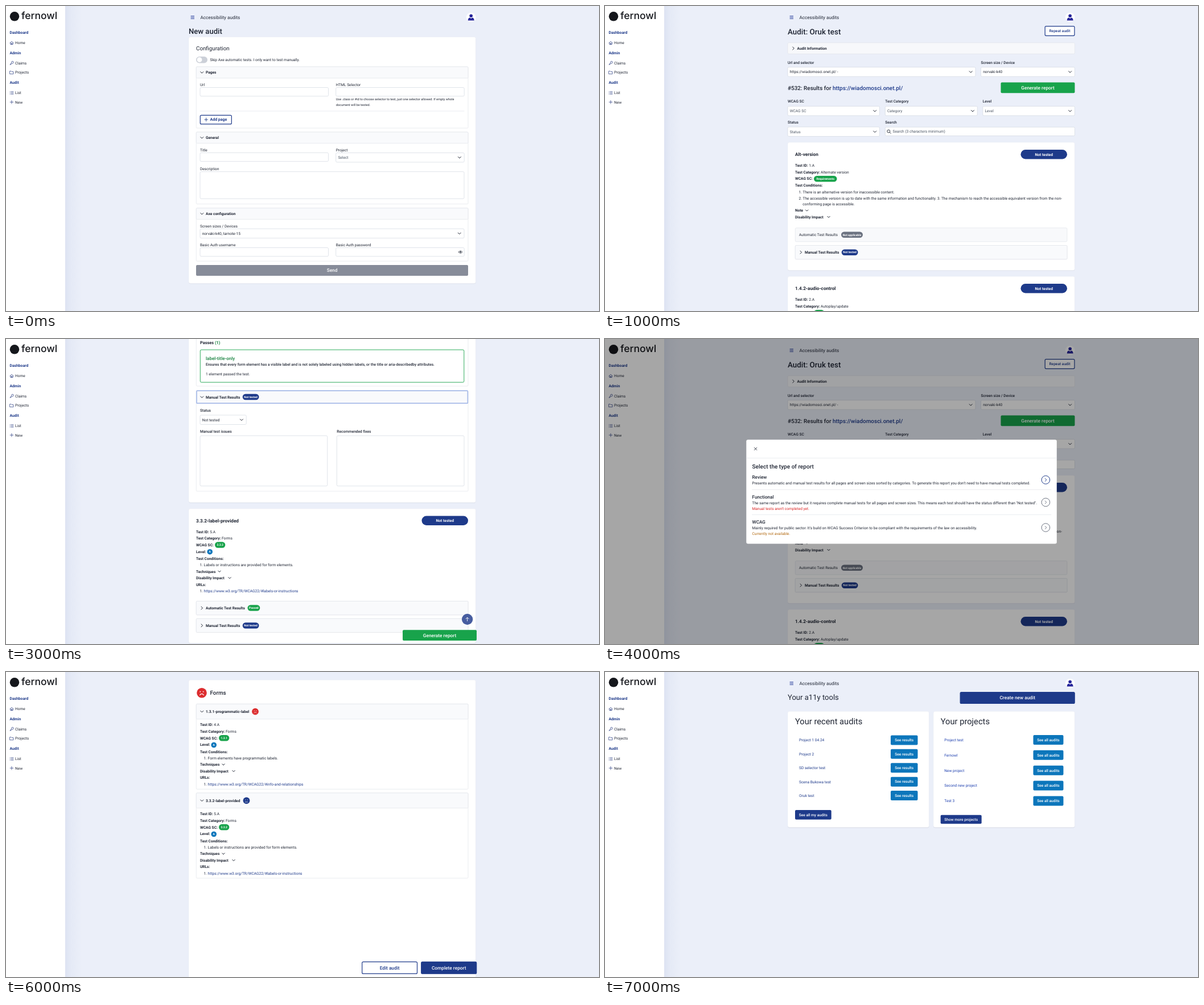
Recreate the animation shown at these times as an HTML page. Size 1042 by 537 pixels, loop 8000 ms.

```html
<!DOCTYPE html>
<html lang="en">
<head>
<meta charset="utf-8">
<title>Accessibility audits</title>
<style>
  html, body { margin: 0; width: 100%; height: 100%; overflow: hidden; background: #ebeff9; }
  svg { display: block; width: 1042px; height: 537px; }
  text { font-family: Roboto, "Open Sans", sans-serif; text-rendering: geometricPrecision; white-space: pre; }
  .word { font-family: Inter, sans-serif; }
  .scene { display: none; }
  .scene.on { display: inline; }
</style>
</head>
<body>
<svg id="stage" viewBox="0 0 1042 537" xmlns="http://www.w3.org/2000/svg"></svg>
<script>
const INK = '#1f2533', NAVY = '#1e3a8a', GREEN = '#18a34b', RED = '#dc2d2f', BLUE = '#0c76bb',
      GRAY = '#6b7280', LINE = '#e1e4ea', EDGE = '#d3d8e1';
const STEP = 1000;
const SITE = 'https://wiadomosci.onet.pl/';

// Basic shapes; text is placed by the middle of its capitals.
const rect = (x, y, w, h, fill, stroke = 'none', r = 2, sw = .7) =>
  `<rect x="${x}" y="${y}" width="${w}" height="${h}" rx="${r}" fill="${fill}" stroke="${stroke}" stroke-width="${sw}"/>`;
const text = (x, y, s, size = 6.6, weight = 400, fill = INK, anchor = 'start') =>
  `<text x="${x}" y="${y + size * .35}" font-size="${size}" font-weight="${weight}" fill="${fill}" text-anchor="${anchor}">${s}</text>`;
const bold = (x, y, s, size = 6.6, fill = INK) => text(x, y, s, size, 600, fill);
const mid = (x, y, s, size, weight, fill) => text(x, y, s, size, weight, fill, 'middle');
const path = (d, stroke = INK, sw = 1, fill = 'none') =>
  `<path d="${d}" fill="${fill}" stroke="${stroke}" stroke-width="${sw}" stroke-linecap="round" stroke-linejoin="round"/>`;
const circle = (x, y, r, fill, stroke = 'none', sw = 1) =>
  `<circle cx="${x}" cy="${y}" r="${r}" fill="${fill}" stroke="${stroke}" stroke-width="${sw}"/>`;
const rule = (x, y, w) => path(`M${x} ${y}h${w}`, LINE, .7);

// Interface parts
const down = (x, y, c, k = 2.5) => path(`M${x - k} ${y - k / 2}l${k} ${k}l${k} ${-k}`, c);
const right = (x, y, c, k = 2.5) => path(`M${x - k / 2} ${y - k}l${k} ${k}l${-k} ${k}`, c);
const field = (x, y, w, h = 15.3) => rect(x, y, w, h, '#fff', EDGE);
const select = (x, y, w, s, fill = INK) =>
  field(x, y, w, 16.5) + text(x + 3.7, y + 8.3, s, 6.6, 400, fill) + down(x + w - 8.3, y + 8.3);
const button = (x, y, w, h, s, size, fill, stroke, color = '#fff') =>
  rect(x, y, w, h, fill, stroke, 2, 1.2) + mid(x + w / 2, y + h / 2, s, size, 500, color);
const pill = (x, y, w, s, fill) =>
  rect(x, y - 5.2, w, 10.4, fill, 'none', 5.2) + mid(x + w / 2, y, s, 5, 700, '#fff');
const badge = y => rect(730.5, y - 8.2, 81.5, 16.4, NAVY, 'none', 8.2) + mid(771.3, y, 'Not tested', 6.7, 700, '#fff');
const card = (x, y, w, h) =>
  rect(x, y + .8, w, h, '#d5dae6', 'none', 3) + rect(x, y, w, h, '#fff', '#e6e9f1', 3, .5);
const panel = (y, h, head, s) =>
  rect(334.3, y, 477.7, h, '#fff', LINE, 1.5) + rect(334.3, y, 477.7, head, '#f9fafc', LINE, 1.5) +
  (h > head ? down : right)(344.3, y + head / 2) + bold(351, y + head / 2, s);
const face = (x, y, r, fill, bend) => {
  const k = r / 9;
  return circle(x, y, r, fill) + circle(x - 2.7 * k, y - 2 * k, .9 * k, '#fff') + circle(x + 2.7 * k, y - 2 * k, .9 * k, '#fff') +
    path(`M${x - 3.5 * k} ${y + 4 * k}q${3.5 * k} ${bend * k} ${7 * k} 0`, '#fff', 1.1 * k);
};
const logo = (x, y, size) =>
  circle(x, y, size / 2, '#15171c') +
  `<text class="word" x="${x + 12}" y="${y + size * .27}" font-size="${size * 1.06}" font-weight="500" fill="#15171c">fernowl</text>`;

const sidebar = () => {
  const icons = {
    Home: 'M7 65l3-2.7l3 2.7M7.8 64.6v3h4.4v-3M9.4 67.6v-2h1.2v2',
    Claims: 'M9.7 99.7a1.8 1.8 0 1 1 1.5 1.2L7.2 103.6l.6-1.6z',
    Projects: 'M7 114.7h2.2l.9 1h2.9v4h-6z',
    List: 'M8.8 150.8h4.2M8.8 153h4.2M8.8 155.2h4.2M7 150.8h.2M7 153h.2M7 155.2h.2',
    New: 'M10 166.4v5.6M7.2 169.2h5.6'
  };
  const heads = { Dashboard: 47, Admin: 83, Audit: 135 };
  const items = { Home: 65, Claims: 100.7, Projects: 117, List: 153, New: 169.2 };
  return rect(0, 0, 104, 537, '#fff', 'none', 0) + logo(15, 18.3, 16.5) +
    Object.entries(heads).map(([s, y]) => bold(6.5, y, s, 6.75, NAVY)).join('') +
    Object.entries(items).map(([s, y]) => text(16, y, s) + path(icons[s], '#3a4c8c', .8)).join('');
};

const header = () =>
  path('M325 17.7h5.6M325 20h5.6M325 22.3h5.6', '#3146a0', 1) + text(341.5, 20, 'Accessibility audits', 8.15) +
  circle(817.2, 20, 8.3, '#fff') + circle(817.2, 17.3, 2.8, '#25259a') +
  path('M812 25.2q0-4.2 3-4.4l2.2 1.2l2.2-1.2q3 .2 3 4.4z', '#25259a', .4, '#25259a');

const pair = (x, y, key, value = '') => text(x, y, `<tspan font-weight="600">${key}</tspan> ${value}`);

function formScene() {
  return header() + text(321, 44.7, 'New audit', 13.1, 500) + card(321, 54.5, 504.5, 434) +
    text(334, 75, 'Configuration', 9.8) +
    rect(334, 89, 20, 11.4, '#ccd0d8', 'none', 5.7) + circle(340, 94.7, 4.4, '#fff') +
    text(358.5, 94.7, 'Skip Axe automatic tests. I only want to test manually.') +
    panel(107, 108, 20, 'Pages') +
    text(341, 138.5, 'Url') + field(341, 143.5, 225.5) +
    text(579.7, 138.5, 'HTML Selector') + field(579.7, 143.5, 225.5) +
    text(579.7, 164.3, 'Use .class or #id to choose selector to test, just one selector allowed. If empty whole', 5.55) +
    text(579.7, 174, 'document will be tested.', 5.55) + rule(341, 185, 464) +
    rect(341.3, 192.3, 55, 15.6, '#fff', NAVY, 2, 1.2) + path('M351.7 197.2v5.6M348.9 200h5.6', NAVY, .9) +
    bold(358.5, 200, 'Add page', 7, NAVY) +
    panel(222, 126.6, 19.7, 'General') +
    text(341, 253.3, 'Title') + field(341, 258.3, 225.5) +
    text(579.7, 253.3, 'Project') + select(579.7, 258.5, 225.5, 'Select', '#4b5563') +
    text(341, 286.8, 'Description') + field(341, 291.7, 464, 47.6) +
    panel(355.8, 93.4, 19.8, 'Axe configuration') +
    text(341, 387.2, 'Screen sizes / Devices') + select(341, 392.2, 464, 'norvaki-k40, tarnote-15') +
    text(341, 420.7, 'Basic Auth username') + field(341, 425.5, 225.5) +
    text(579.7, 420.7, 'Basic Auth password') + field(579.7, 425.5, 225.5) +
    path('M795.4 433.2q3.2-4.4 6.4 0q-3.2 4.4-6.4 0z', INK, .8) + circle(798.6, 433.2, 1.1, INK) +
    rect(334, 456, 478, 19, '#878c99') + mid(573, 465.6, 'Send', 8.2, 500, '#fff');
}

function resultsScene() {
  const ph = '#4b5563';
  return header() + text(321, 45, 'Audit: Oruk test', 13.4, 500) +
    button(773.2, 35.7, 51.8, 16.6, 'Repeat audit', 6.6, '#fff', NAVY, NAVY) +
    rect(321, 64.7, 504.5, 19.6, '#f7f8fb', LINE) + right(331, 74.5) + bold(337.5, 74.5, 'Audit Information') +
    text(321, 99.3, 'Url and selector', 6.6, 500) + select(321, 107.7, 330, SITE + ' -') +
    text(660.5, 99.3, 'Screen size / Device', 6.6, 500) + select(660.5, 107.7, 165, 'norvaki-k40') +
    text(321, 144.2, `#532: Results for <tspan fill="${NAVY}">${SITE}</tspan>`, 9.95, 500) +
    button(695.5, 134.6, 130, 18.6, 'Generate report', 8.3, GREEN, 'none') +
    text(321, 168, 'WCAG SC', 6.6, 500) + select(321, 176.5, 161.5, 'WCAG SC', ph) +
    text(492.3, 168, 'Test Category', 6.6, 500) + select(492.3, 176.5, 162, 'Category', ph) +
    text(663.8, 168, 'Level', 6.6, 500) + select(663.8, 176.5, 161.7, 'Level', ph) +
    text(321, 204.8, 'Status', 6.6, 500) + select(321, 213, 161.5, 'Status', ph) +
    text(492.3, 204.8, 'Search', 6.6, 500) + field(492.3, 213.2, 333.2, 15.4) +
    circle(498.3, 220.5, 2.5, 'none', INK, .9) + path('M500.2 222.4l2 2', INK, .9) +
    text(505.5, 221, 'Search (3 characters minimum)', 6.6, 400, ph) +
    card(321, 240, 504.5, 225.5) + bold(334, 261.2, 'Alt-version', 8.2) + badge(261.2) +
    pair(334, 281, 'Test ID:', '1.A') + pair(334, 292.5, 'Test Category:', 'Alternate version') +
    pair(334, 304, 'WCAG SC:') + pill(367, 304.2, 40.5, 'Requirements', GREEN) +
    pair(334, 316, 'Test Conditions:') +
    text(340.5, 327.3, '1. There is an alternative version for inaccessible content.') +
    text(340.5, 338.7, '2. The accessible version is up to date with the same information and functionality. 3. The mechanism to reach the accessible equivalent version from the non-') +
    text(347.3, 348.7, 'conforming page is accessible.') +
    pair(334, 360, 'Note') + down(354.7, 360, INK, 2.2) +
    pair(334, 371.4, 'Disability Impact') + down(393, 371.4, INK, 2.2) +
    rect(334.3, 390.7, 477.7, 24.2, '#f8f9fb', LINE) + text(341, 403, 'Automatic Test Results') +
    pill(415, 402.8, 38, 'Not applicable', GRAY) +
    panel(421.5, 24.3, 24.3, 'Manual Test Results') + pill(415.7, 433.7, 28.8, 'Not tested', NAVY) +
    card(321, 476, 504.5, 90) + bold(334, 497.3, '1.4.2-audio-control', 8.2) + badge(497.2) +
    pair(334, 517, 'Test ID:', '2.A') + pair(334, 528.3, 'Test Category:', 'Autoplay/update') +
    pair(334, 540, 'WCAG SC:') + pill(367, 540.3, 18.5, '1.4.2', GREEN);
}

const labelTest = {
  title: '1.3.1-programmatic-label', id: '4.A', sc: '1.3.1',
  rule: 'Form elements have programmatic labels.', url: 'info-and-relationships'
};
const hintTest = {
  title: '3.3.2-label-provided', id: '5.A', sc: '3.3.2',
  rule: 'Labels or instructions are provided for form elements.', url: 'labels-or-instructions'
};

const details = (x, y, d) =>
  pair(x, y, 'Test ID:', d.id) + pair(x, y + 11.5, 'Test Category:', 'Forms') +
  pair(x, y + 23.2, 'WCAG SC:') + pill(x + 33, y + 23.3, 18.3, d.sc, GREEN) +
  pair(x, y + 35, 'Level:') + circle(x + 24.2, y + 35.5, 4.8, BLUE) + mid(x + 24.2, y + 35.5, 'A', 5, 700, '#fff') +
  pair(x, y + 47.2, 'Test Conditions:') + text(x + 6.5, y + 58.5, '1. ' + d.rule) +
  pair(x, y + 70, 'Techniques') + down(x + 41, y + 70, INK, 2.2) +
  pair(x, y + 81.5, 'Disability Impact') + down(x + 59, y + 81.5, INK, 2.2) +
  pair(x, y + 93, 'URLs:') +
  text(x + 6.5, y + 104.2, `1. <tspan fill="${NAVY}">https://www.w3.org/TR/WCAG22/#${d.url}</tspan>`);

const testHead = (y, d) => bold(334, y + 21, d.title, 8.2) + badge(y + 21) + details(334, y + 40.4, d);

const passes = y =>
  bold(341, y, `Passes <tspan fill="#15803d">(1)</tspan>`, 7.4) +
  rect(341.3, y + 12.8, 463.5, 57.2, '#fff', GREEN, 2, .9) +
  text(351, y + 28.3, 'label-title-only', 8, 500, '#15803d') +
  text(351, y + 39, 'Ensures that every form element has a visible label and is not solely labeled using hidden labels, or the title or aria-describedby attributes.', 6.55, 500) +
  text(351, y + 55.3, '1 element passed the test.');

const closedTest = (y, d) =>
  card(321, y, 504.5, 237) + testHead(y, d) +
  panel(y + 162.7, 24.3, 24.3, 'Automatic Test Results') + pill(424.5, y + 174.7, 21.8, 'Passed', GREEN) +
  panel(y + 193.5, 24.3, 24.3, 'Manual Test Results') + pill(415.7, y + 205.7, 28.8, 'Not tested', NAVY);

const floating = () =>
  circle(810.6, 493.5, 9.7, '#475da0') + path('M810.6 496.6v-6.2M808 492.8l2.6-2.6l2.6 2.6', '#fff', .9) +
  button(697, 512.2, 130, 18.8, 'Generate report', 8.3, GREEN, 'none');

function openTestScene() {
  return card(321, 7, 504.5, 328) + testHead(7, labelTest) +
    panel(169.7, 113.5, 24.3, 'Automatic Test Results') + pill(424.5, 181.8, 21.8, 'Passed', GREEN) + passes(206) +
    panel(291, 24.3, 24.3, 'Manual Test Results') + pill(415.7, 303.1, 28.8, 'Not tested', NAVY) +
    closedTest(346, hintTest) + floating();
}

function manualScene() {
  return card(321, -60, 504.5, 348) + rect(334.3, -40, 477.7, 123, '#fff', LINE) + passes(6.2) +
    panel(91, 177, 22.5, 'Manual Test Results') + rect(335, 91.2, 476.3, 22, 'none', '#a9bce9', 1, 1.7) +
    pill(415.7, 102, 28.8, 'Not tested', NAVY) +
    text(341, 126, 'Status', 6.6, 500) + select(341, 134, 81.2, 'Not tested') +
    text(341, 162.3, 'Manual test issues', 6.6, 500) + field(341, 170.3, 223.7, 88.5) +
    text(581.3, 162.3, 'Recommended fixes', 6.6, 500) + field(581.3, 170.3, 223.7, 88.5) +
    closedTest(298.8, hintTest) + floating();
}

function modalScene() {
  const option = (y, cy, title, info, note = '', color = '', ring = GRAY) =>
    text(258.5, y, title, 8.15, 500) + text(258.5, y + 10.5, info) + text(258.5, y + 20.4, note, 6.6, 400, color) +
    circle(774.4, cy, 7.3, '#fff', ring, 1) + right(774.6, cy, ring, 2.4);
  return rect(248.3, 177.2, 545.5, 183.4, '#fff', 'none', 3) +
    path('M262.4 191.1l4.4 4.4M266.8 191.1l-4.4 4.4', INK, .9) + rule(248.3, 209.7, 545.5) +
    text(258.5, 224, 'Select the type of report', 10.05, 500) +
    option(243.5, 248, 'Review', "Presents automatic and manual test results for all pages and screen sizes sorted by categories. To generate this report you don't need to have manual tests completed.", '', '', NAVY) +
    rule(258.5, 265.2, 525.5) +
    option(278, 287.5, 'Functional', 'The same report as the review but it requires complete manual tests for all pages and screen sizes. This means each test should have the status different than "Not tested".', "Manual tests aren't completed yet.", '#d92020') +
    rule(258.5, 309.3, 525.5) +
    option(322.4, 332, 'WCAG', "Mainly required for public sector. It's build on WCAG Success Criterion to be compliant with the requirements of the law on accessibility.", 'Currently not available.', '#b0660c');
}

const reportButtons = () =>
  button(625.7, 510.4, 96.8, 20.8, 'Edit audit', 8.3, '#fff', NAVY, NAVY) +
  button(729.7, 510.4, 97, 20.8, 'Complete report', 8.3, NAVY, NAVY);

const formsHead = y => card(321, y, 504.5, 600) + face(344, y + 22.7, 8.8, RED, -4.5) + text(358.5, y + 23, 'Forms', 9.9, 500);

function reportScene() {
  const link = (y, s) => text(404, y, s, 6.6, 400, NAVY);
  const dots = [217.3, 230.5, 268, 277.7].map(y => circle(397.7, y, 1, INK)).join('');
  return header() + button(321.4, 35.6, 51.4, 16.6, 'Repeat audit', 6.6, '#fff', NAVY, NAVY) +
    card(321, 62.7, 504.5, 356.3) + logo(533, 86.3, 17.5) +
    rect(507.7, 109, 130.8, 15.4, BLUE, 'none', 7.7) + mid(573, 116.8, 'review report preview', 8.2, 500, '#fff') +
    mid(573, 141.2, 'Accessibility Audit Report "Oruk test"', 13.5, 500) +
    mid(573, 161.8, 'Created by Admin Frey in "Fernowl" project on 19.03.2024.', 6.6) +
    text(391, 206.5, 'Pages:', 7.4, 500) + dots + link(217.3, SITE) +
    link(230.4, SITE + 'kraj/dane-policjantow-trafily-do-sieci-po-protescie-r') +
    link(240.2, 'olnikow-dostaja-grozby/xxvytfs') +
    text(391, 257, 'Screen sizes / Devices:', 7.4, 500) + text(404, 267.8, '[ 360, 760 ]') + text(404, 277.6, '[ 1280, 800 ]') +
    rect(658.8, 193.8, 95.8, 95.6, '#f4f4f6', RED, 2, 1.8) + rect(658.8, 193.8, 95.8, 18, RED, 'none', 1) +
    mid(706.7, 203.4, 'ISSUES', 8.3, 600, '#fff') + mid(706.7, 252, '201', 30, 700, RED) +
    text(391, 305.8, 'Auditor comment:', 7.4, 500) + field(391, 315.2, 364.3, 88.2) +
    formsHead(429.7) +
    panel(472, 26.6, 26.6, labelTest.title) + face(438, 485.3, 5.9, RED, -4.5) +
    panel(505.2, 26.6, 26.6, hintTest.title) + face(422.5, 518.5, 5.9, NAVY, 0) + reportButtons();
}

function reportDetailScene() {
  return formsHead(14) +
    panel(56.3, 150, 26.6, labelTest.title) + face(438, 69.6, 5.9, RED, -4.5) + details(341, 93, labelTest) +
    panel(213, 150, 26.6, hintTest.title) + face(422.5, 226.3, 5.9, NAVY, 0) + details(341, 250, hintTest) +
    reportButtons();
}

function homeScene() {
  const audits = ['Project 1 04.24', 'Project 2', 'SD selector test', 'Scena Bukowa test', 'Oruk test'];
  const projects = ['Project test', 'Fernowl', 'New project', 'Second new project', 'Test 3'];
  return header() + text(321, 44.8, 'Your a11y tools', 13.05) +
    button(624.2, 35.6, 201, 19.8, 'Create new audit', 8.3, NAVY, NAVY) +
    card(321, 69.3, 248.5, 204.3) + card(577, 69.3, 248.5, 204.3) +
    text(334, 87, 'Your recent audits', 14.7) + text(589.7, 87, 'Your projects', 14.7) +
    audits.map((s, i) => text(341, 120 + i * 24.42, s, 6.6, 400, NAVY) +
      button(502, 111.4 + i * 24.42, 47.5, 17, 'See results', 6.6, BLUE, 'none')).join('') +
    projects.map((s, i) => text(596.3, 119.6 + i * 26.85, s, 6.6, 400, '#1d3fae') +
      button(752.5, 111 + i * 26.85, 53, 17, 'See all audits', 6.6, BLUE, 'none')).join('') +
    button(334, 243, 63.7, 16.8, 'See all my audits', 6.6, NAVY, 'none') +
    button(589.7, 251.7, 72, 15.6, 'Show more projects', 6.6, NAVY, 'none');
}

const shade = rect(0, 0, 1042, 537, 'rgba(0,0,0,.35)', 'none', 0);
const scenes = [formScene(), resultsScene(), openTestScene(), manualScene(),
  resultsScene() + shade + modalScene(), reportScene(), reportDetailScene(), homeScene()];

const stage = document.getElementById('stage');
stage.innerHTML =
  `<defs><linearGradient id="edge"><stop stop-color="#dde3f2"/><stop offset=".35" stop-color="#e5eaf6"/><stop offset="1" stop-color="#ebeff9"/></linearGradient></defs>` +
  rect(0, 0, 1042, 537, '#ebeff9', 'none', 0) + rect(104, 0, 30, 537, 'url(#edge)', 'none', 0) + sidebar() +
  scenes.map(s => `<g class="scene">${s}</g>`).join('');

// The missing half second of scroll is a hard cut: one view per step.
const views = [...stage.querySelectorAll('.scene')];
const order = [0, 1, 3, 4, 5, 7];
const start = performance.now();
function draw(now) {
  const i = Math.floor(Math.max(0, now - start) / STEP) % views.length;
  views.forEach((v, k) => v.classList.toggle('on', k === i));
  requestAnimationFrame(draw);
}
draw(start);
</script>
</body>
</html>
```
